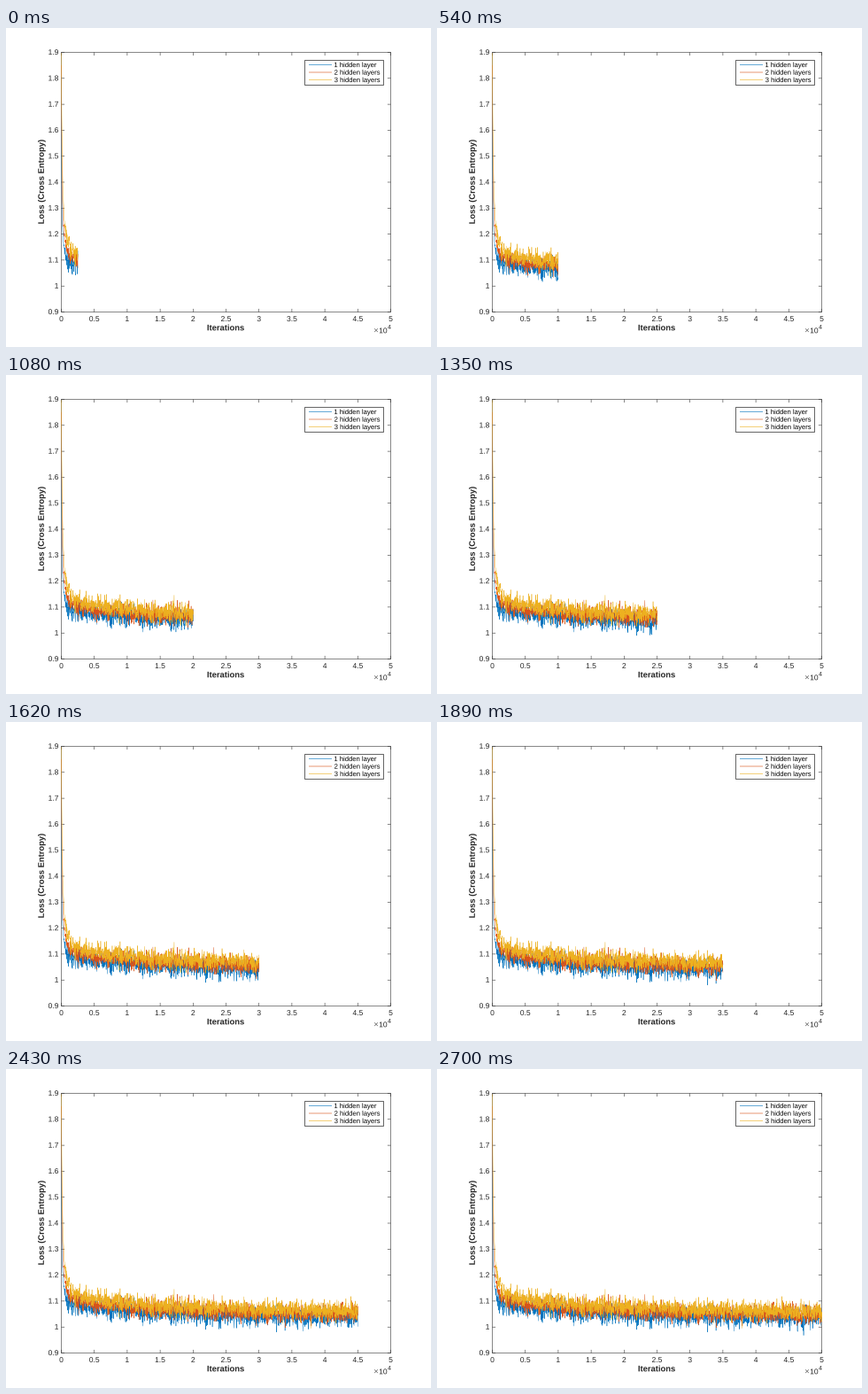
A matplotlib script that plays this animation: 480x360 px, repeating every 2.97 s.

```python
import numpy as np
import matplotlib.pyplot as plt
from matplotlib.animation import FuncAnimation
from matplotlib.patches import PathPatch, Rectangle
from matplotlib.textpath import TextPath
from matplotlib.transforms import Affine2D

W, H, DPI = 480, 360, 100
PX = 72 / DPI  # points per pixel
LEFT, RIGHT, TOP, BOTTOM = 62.5, 434.5, 27.5, 320.5
MAX_ITER, Y_MIN, Y_MAX = 50000, 0.9, 1.9
STEP = 25
FRAMES, INTERVAL = 11, 270
INK = (0.15, 0.15, 0.15)
COLORS = [(0, 0.447, 0.741), (0.85, 0.325, 0.098), (0.929, 0.694, 0.125)]
NAMES = ["1 hidden layer", "2 hidden layers", "3 hidden layers"]

plt.rcParams["font.family"] = "Liberation Sans"


def to_x(iteration):
    return LEFT + (RIGHT - LEFT) * iteration / MAX_ITER


def to_y(loss):
    return BOTTOM - (BOTTOM - TOP) * (loss - Y_MIN) / (Y_MAX - Y_MIN)


def loss_curve(its, k):
    """Noisy loss: three decays over a slowly falling level; deeper nets lag."""
    level = 1.055 + 0.016 * k - (0.02 + 0.005 * k) * its / MAX_ITER
    slow = 0.05 * np.exp(-its / 7000)
    medium = (0.2 + 0.06 * k) * np.exp(-its / (300 + 80 * k))
    fast = (0.5 - 0.03 * k) * np.exp(-its / (50 + 30 * k))
    noise = np.random.default_rng(20 + k).normal(0, 0.019, its.size)
    return level + slow + medium + fast + noise * np.clip(its / 1200, 0, 1)


fig = plt.figure(figsize=(W / DPI, H / DPI), dpi=DPI, facecolor="white")
ax = fig.add_axes([0, 0, 1, 1])
ax.set_xlim(0, W)
ax.set_ylim(H, 0)
ax.axis("off")


def stroke(xs, ys, color=INK, width=0.55, z=1):
    return ax.plot(xs, ys, color=color, lw=width * PX, zorder=z, snap=False,
                   solid_joinstyle="round", solid_capstyle="butt")[0]


def box(x0, y0, x1, y1, fill, width, z):
    ax.add_patch(Rectangle((x0, y0), x1 - x0, y1 - y0, facecolor=fill,
                           edgecolor=INK, lw=width * PX, zorder=z, snap=False))


def label(x, y, text, size=8.5, align=0.5, color=INK, weight="normal", angle=0):
    """Text outline on baseline y; align is 0 left, 0.5 centre, 1 right."""
    path = TextPath((0, 0), text, size=size, prop={"weight": weight})
    bounds = path.get_extents()
    shift = bounds.x0 + align * bounds.width
    place = Affine2D().translate(-shift, 0).scale(1, -1)
    place.rotate_deg(-angle).translate(x, y)
    ax.add_patch(PathPatch(place.transform_path(path), facecolor=color,
                           lw=0, zorder=6, snap=False))


def draw_axes():
    box(LEFT, TOP, RIGHT, BOTTOM, "none", 0.55, 1)
    tick = 3.6
    for i in range(11):
        x = to_x(i * 5000)
        stroke([x, x], [BOTTOM, BOTTOM - tick])
        stroke([x, x], [TOP, TOP + tick])
        label(x, 331, f"{i * 0.5:g}")
        loss = Y_MIN + i * 0.1
        y = to_y(loss)
        stroke([LEFT, LEFT + tick], [y, y])
        stroke([RIGHT, RIGHT - tick], [y, y])
        label(59, y + 2.6, f"{loss:.2g}", align=1)
    label(248.2, 341.3, "Iterations", 9.4, weight="bold")
    label(42.8, 173.5, "Loss (Cross Entropy)", 9.4, weight="bold", angle=90)
    label(418, 344.3, "×", 9.5, color="0.4")
    label(421.8, 344.3, "10", align=0)
    label(433, 339.8, "4", 7)


def draw_legend():
    box(337.5, 36.5, 426.5, 64.5, "white", 0.7, 4)
    for i, (name, color) in enumerate(zip(NAMES, COLORS)):
        y = 41.5 + 8.5 * i
        stroke([342, 368], [y, y], color, 0.6, 5)
        label(371, y + 2.6, name, 7.65, align=0, color="black")


draw_axes()
draw_legend()

its = np.arange(0, MAX_ITER + 1, STEP)
xs = to_x(its)
curves = [to_y(loss_curve(its, k)) for k in range(3)]
lines = [stroke([], [], color, 0.45, 3) for color in COLORS]


def update(frame):
    shown = max(2500, 5000 * frame)
    n = shown // STEP + 1
    for line, ys in zip(lines, curves):
        line.set_data(xs[:n], ys[:n])
    return lines


anim = FuncAnimation(fig, update, frames=FRAMES, interval=INTERVAL,
                     repeat=True, repeat_delay=0)
plt.show()
```
